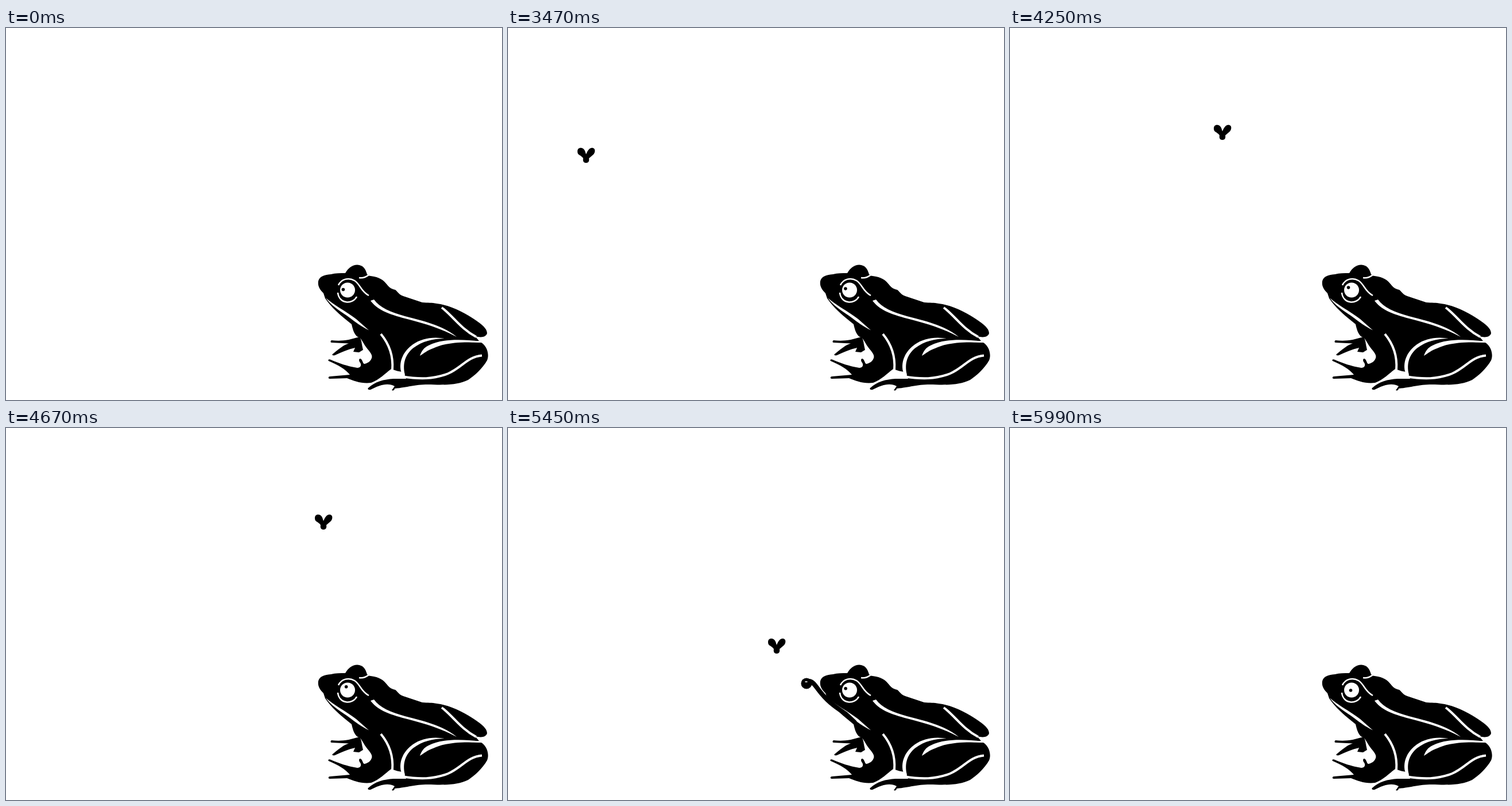
An HTML page that plays this animation: 864 px wide and 648 px high, repeating every 6460 ms.

```html
<!DOCTYPE html>
<html lang="en">
<head>
<meta charset="utf-8">
<title>Frog and fly</title>
<style>
  html, body { margin: 0; width: 100%; height: 100%; overflow: hidden; background: #fff; }
  svg { display: block; width: 100%; height: 100%; }
  .white { fill: #fff; }
  .line { fill: none; stroke: #fff; stroke-width: 4; }
  .thin { stroke-width: 2.5; }
</style>
</head>
<body>
<svg viewBox="0 0 864 648">
  <!-- head, back and belly -->
  <path d="M553 462C545 454 543 448 544 441C546 433 553 430 566 429C574 427 582 427 591 427C597 417 603 413 612 412.500C622 413 626 419 629 429L632 431.500C645 433 655 436 662 445C667 451 669 454 678 456C683 460 685 465 692 467L725 478C735 479 742 478 750 480C775 483 800 496 821 511C834 520 838 526 838 532C836 538 829 540 817 537L824 545L780 552L720 575L690 599C684 598 679 597 674 595L640 570L618 541L611 537C605 530 604 524 602 516C586 503 569 490 556 471Z"/>
  <!-- far hand -->
  <path d="M616 538L597 543C586 545 577 545 567 544C565 545 565 548 567 548L597 549.500C588 552 579 560 569 568C567 570 570 571 573 570C584 565 595 560 608 557L605 564L615 565L623 560L618 542Z"/>
  <!-- gap behind the near arm -->
  <path class="white" d="M618 542C620 555 628 562 637 574L625 582L615 575L622 561Z"/>
  <!-- near arm -->
  <path d="M634 528L654 534C664 547 673 567 671 594C660 602 650 613 636 618C620 620 606 615 594 610L564 611C561 611 561 607 564 607L599 604C592 595 579 587 562 580C560 578 563 576 566 578C580 584 594 589 612 592C617 592 620 588 617 583C613 578 616 574 619 577C622 581 622 586 625 585C632 583 635 580 637 575C640 568 629 560 624 551L618 541Z"/>
  <!-- hind leg and foot -->
  <path d="M694 603C690 590 692 575 702 563C715 551 738 547 765 546L828 548C839 555 842 570 838 579C830 593 817 605 805 613C787 622 765 622 735 621C711 621 700 626 677 628C677 631 674 632 672 631L677 624C665 617 650 622 635 630C632 631 629 629 631 627C643 616 658 612 675 611L697 611Z"/>
  <!-- tapered markings -->
  <g class="white">
    <path d="M692 605L688 598C684 580 693 562 709 551C723 541 744 537 764 541C743 541 725 546 710 557C696 568 690 584 695 604Z"/>
    <path d="M721 571C724 562 728 557 736 553C755 543 786 541 827 546L826 548C788 546 764 549 744 558C733 562 729 566 721 571Z"/>
    <path d="M635 475L641 473C651 487 670 495 695 502C731 511 764 520 785 538C757 523 730 515 697 506.500C664 498 646 490 635 475Z"/>
    <path d="M557 470C571 483 592 493 610 507L632 526.500C617 519 607 511 595 502C579 491 566 483 557 470Z"/>
    <ellipse cx="595" cy="456.500" rx="13" ry="13"/>
  </g>
  <!-- even markings -->
  <g class="line">
    <path d="M653 533C667 550 675 569 673 595"/>
    <path d="M690 607C720 612 745 612 770 602C795 591 803 573 829 570.500"/>
    <path d="M759 487C778 501 791 523 819 538"/>
    <path class="thin" d="M579 448C584 437 597 434 607 440C617 446 618 459 632 466"/>
    <path class="thin" d="M578 461C580 481 604 482 611 468"/>
    <path class="thin" d="M615 435C622 436 627 434 632 430"/>
  </g>
  <circle id="pupil" r="2.800"/>
  <g id="tongue">
    <path fill="none" stroke="#000" stroke-width="8" stroke-linecap="round" d="M527 441C535 441 540 453 550 464C562 479 579 490 591 498L606 512"/>
    <circle cx="522.500" cy="445" r="9.500"/>
    <ellipse class="white" cx="522" cy="442" rx="2.500" ry=".9"/>
  </g>
  <path id="fly" d="M-15-7C-15-15-5-15-2-8L0-2C4-11 7-14 12-13C17-12 16-4 12-1L5 5C6 10 4 13 0 13C-4 13-6 10-5 5C-7 2-9 1-12-1C-14-2-15-4-15-7Z"/>
</svg>
<script>
const LOOP = 6460, STEP = 30;
const ENTER = 2960, LICK = 5330, CATCH = 5570, SWALLOW = 5960;
const [pupil, tongue, fly] = ['pupil', 'tongue', 'fly'].map(id => document.getElementById(id));

// Turning points of the flight: time, x, y.
const flight = [
  [ENTER, -4, 310], [3470, 136, 222], [3640, 180, 162], [3830, 254, 202], [4250, 370, 182],
  [4670, 553, 164], [4850, 594, 178], [5450, 468, 380], [CATCH, 482, 419]
];

// Smooth curve through the turning points, held at both ends.
function flyAt(time) {
  const last = flight.length - 1;
  const t = Math.min(Math.max(time, ENTER), CATCH);
  const i = Math.max(flight.findIndex(p => p[0] >= t), 1) - 1;
  const a = flight[i], b = flight[i + 1], span = b[0] - a[0], u = (t - a[0]) / span;
  const slope = (k, axis) => {
    const p = flight[Math.max(k - 1, 0)], q = flight[Math.min(k + 1, last)];
    return (q[axis] - p[axis]) / (q[0] - p[0]) * span;
  };
  return [1, 2].map(axis =>
    a[axis] + (b[axis] - a[axis]) * u * u * (3 - 2 * u)
      + slope(i, axis) * u * (1 - u) ** 2 - slope(i + 1, axis) * u * u * (1 - u));
}

// 0 inside the mouth, 1 fully out: a fast flick, then a steady pull.
const reach = t => t < CATCH
  ? Math.sin(Math.PI / 2 * (t - LICK) / (CATCH - LICK))
  : 1 - (t - CATCH) / (SWALLOW - CATCH);

function place(node, x, y, visible = true) {
  node.setAttribute('transform', `translate(${x} ${y})`);
  node.style.display = visible ? '' : 'none';
}

function draw(now) {
  const t = ENTER + Math.floor((now % LOOP - ENTER) / STEP) * STEP;
  const out = reach(t), pulled = t > CATCH ? 1 - out : 0;
  let [x, y] = flyAt(t);
  x += 86 * pulled;
  y += 52 * pulled;
  place(fly, x, y, t >= ENTER && t <= SWALLOW);
  place(tongue, 54 - 80 * out, 34 - 48 * out, t >= LICK && t <= SWALLOW);

  // The pupil follows the fly and rests once it is eaten.
  const angle = Math.atan2(y - 457, x - 593.5), look = t > SWALLOW ? 0 : 6.3;
  place(pupil, 593.5 + look * Math.cos(angle), 457 + look * Math.sin(angle));
  requestAnimationFrame(draw);
}
draw(0);
</script>
</body>
</html>
```
